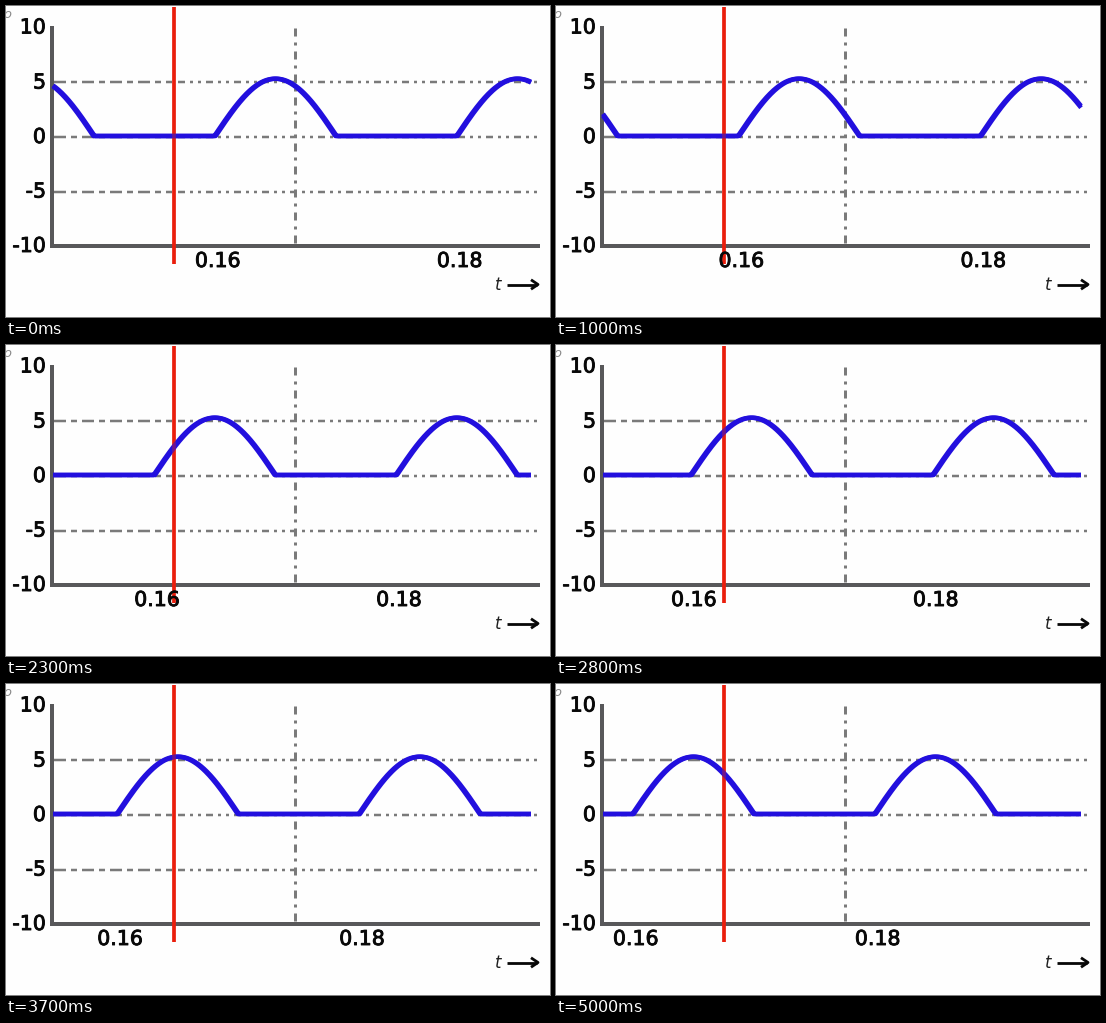
Animation of 544x311 px, one loop 5100 ms. Source, as a matplotlib script:

```python
import numpy as np
import matplotlib.pyplot as plt
from matplotlib.animation import FuncAnimation
import matplotlib.patheffects as pe

W, H, DPI = 544, 311, 100
PX = 72 / DPI              # points per pixel
FRAMES, INTERVAL = 51, 100
SPEED = 2.64               # scroll per frame, in pixels
PERIOD = 242
ZERO, PEAK = 130, 72.7
LEFT, RIGHT = 47, 525
RISE, LABEL = 209, 211.8   # starting places of the pulse foot and the 0.16 label
NIB = 0.7                  # half the extra pen width along x
CURSOR = 168

PAPER, GREY, GRID = "#fefefe", "#58585a", "#7a7a7a"
RED, BLUE, INK = "#ea1e0c", "#220fde", "#080808"

plt.rcParams["lines.scale_dashes"] = False
plt.rcParams["font.family"] = "DejaVu Sans"

fig = plt.figure(figsize=(W / DPI, H / DPI), dpi=DPI, facecolor=PAPER)
ax = fig.add_axes([0, 0, 1, 1])
ax.set_xlim(0, W)
ax.set_ylim(H, 0)
ax.axis("off")


def line(xs, ys, color, width, dashes=None, **kw):
    style = (0, [d * PX for d in dashes]) if dashes else "-"
    kw.setdefault("solid_capstyle", "butt")
    return ax.plot(xs, ys, color=color, lw=width * PX, ls=style, **kw)[0]


def label(x, y, text, size=20.5, color=INK, weight=0.9, **kw):
    t = ax.text(x, y, text, fontsize=size * PX, color=color,
                va="baseline", zorder=8, **kw)
    if weight:
        t.set_path_effects([pe.withStroke(linewidth=weight * PX, foreground=color)])
    return t


# Grid: long dashes on the left, dash and dots on the right
for y in (76, ZERO + 0.5, 186):
    line([48, 166], [y, y], GRID, 2.5, (12, 5, 6, 5), zorder=1)
    line([172, 534], [y, y], GRID, 2.5, (7, 5, 3, 5, 3, 5), zorder=1)
line([289, 289], [22, 238], GRID, 3, (8, 6, 3, 6), zorder=1)

# Axes
line([46, 46], [20, 241.5], GREY, 4, zorder=2)
line([44, 534], [239.7, 239.7], GREY, 4, zorder=2)
for value, y in zip((10, 5, 0, -5, -10), (27.5, 82.5, 137, 191.5, 246)):
    label(40, y, str(value), ha="right")
label(1, 11.5, "o", size=13, color="#8a8a8a", weight=0, ha="center", style="italic")
label(492, 284, "t", size=16.5, color="#202020", weight=0, ha="center", style="italic")
line([501, 531], [278.5, 278.5], INK, 2.8, zorder=3)
line([525, 532, 525], [273.8, 278.5, 283.2], INK, 2.8, zorder=3)

# Cursor, with a translucent copy that tints the curve where they cross
line([CURSOR, CURSOR], [1, 257.5], RED, 3.6, zorder=4)
line([CURSOR, CURSOR], [1, 257.5], RED, 3.6, alpha=0.4, zorder=6)

# Two copies set slightly apart act as a pen wider than it is tall
xs = np.linspace(LEFT, RIGHT, 957)
strokes = [line([], [], BLUE, 4.5, zorder=5, solid_joinstyle="round") for _ in range(2)]
ticks = [label(0, 261, text, ha="center") for text in ("0.16", "0.18")]


def update(i):
    shift = SPEED * i
    for stroke, offset in zip(strokes, (-NIB, NIB)):
        phase = 2 * np.pi * (xs - RISE - offset + shift) / PERIOD
        stroke.set_data(xs, ZERO - (ZERO - PEAK) * np.maximum(np.sin(phase), 0))
    for k, t in enumerate(ticks):
        t.set_x(LABEL + k * PERIOD - shift)
    return [*strokes, *ticks]


anim = FuncAnimation(fig, update, frames=FRAMES, interval=INTERVAL,
                     repeat=True, repeat_delay=0, blit=False)
plt.show()
```
